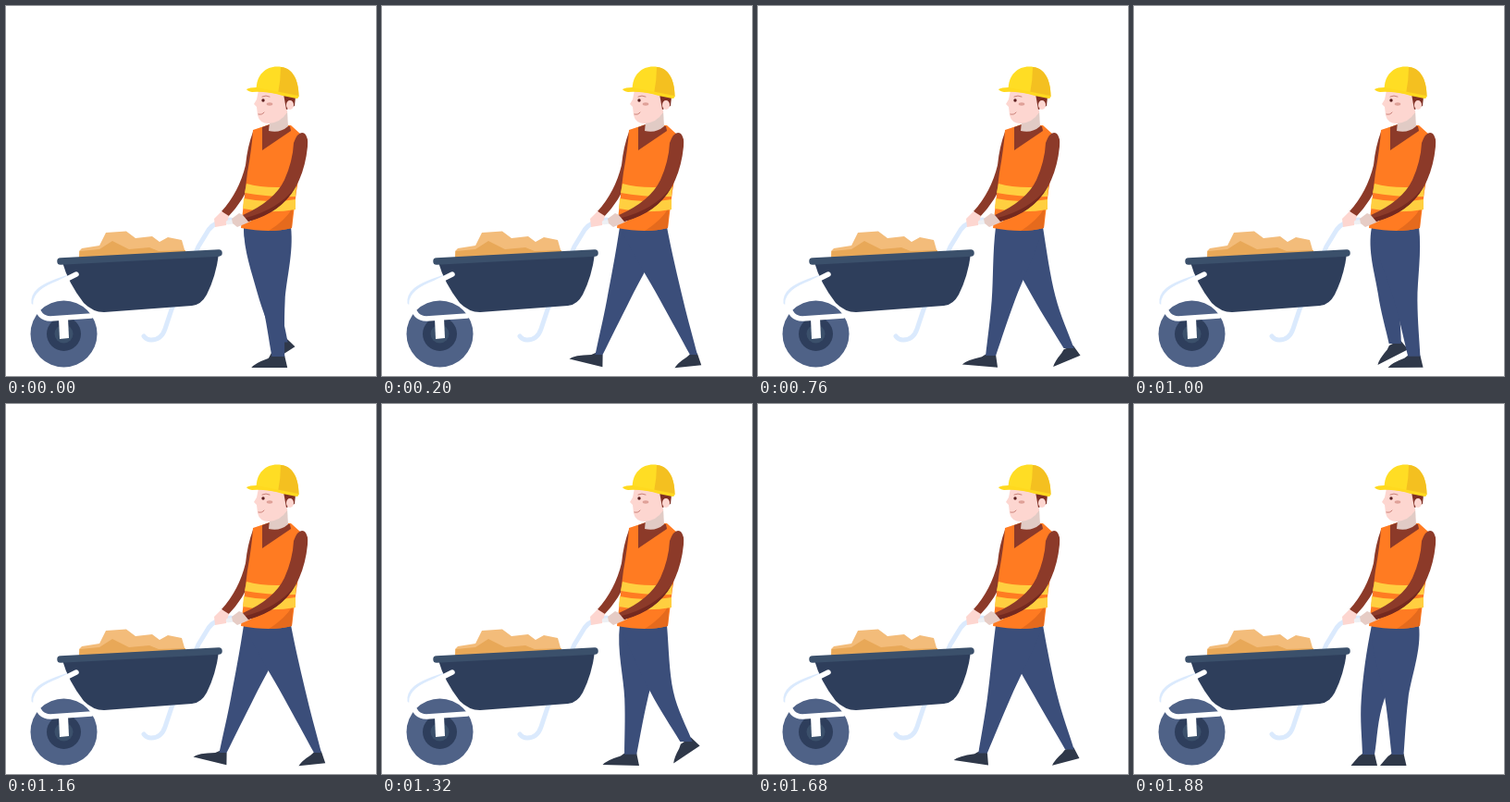
These frames come from a looping animation (400x400 px, 1.92 s). An HTML page:

```html
<!DOCTYPE html>
<html lang="en">
<head>
<meta charset="utf-8">
<title>Worker pushing a wheelbarrow</title>
<style>
html, body { margin: 0; width: 100%; height: 100%; overflow: hidden; background: #fff; }
svg { display: block; width: 100%; height: 100%; }
.line { fill: none; stroke-linecap: round; stroke-linejoin: round; }
.sleeve { fill: #8c3a29; }
.skin { fill: #fdd6d0; }
</style>
</head>
<body>
<svg viewBox="0 0 400 400">
  <!-- wheelbarrow -->
  <g class="line" stroke="#dbeafd" stroke-width="5">
    <path d="M243 231Q226 232 219 242L208 260L179 328L172 349Q168 361 157 361Q152 361 149 357"/>
    <path d="M29 321Q28 313 36 306Q46 298 75 290" stroke-width="3"/>
  </g>
  <circle cx="62.5" cy="354.5" r="36" fill="#4f6287"/>
  <circle cx="62.5" cy="354.5" r="18.5" fill="#2e3e5c"/>
  <circle cx="62.5" cy="354.5" r="10" fill="#3b506b"/>
  <path d="M57 338L67 337L68 359L58 360Z" fill="#fff"/>
  <path d="M79 272V265L82 262L101 259L108 245L130 243.5L140 251L158 249L166 255L175 250L190 253L194 267Z" fill="#f3bc7a"/>
  <path d="M79 272L80 265L101 263L115 254L133 263L155 261L165 265L194 264V268Z" fill="#e8a858"/>
  <path d="M61 277L230 268Q227 292 217 312Q211 323 201 324L106 331Q94 331 84 321Q67 299 61 277Z" fill="#2e3e5b"/>
  <path class="line" d="M59 276L230 267" stroke="#3b506b" stroke-width="7.5"/>
  <path class="line" d="M76 290L58 299Q32 309 32 321Q35 338 48 338L92 335" stroke="#fff" stroke-width="5.5"/>

  <!-- worker -->
  <g id="legs"></g>
  <path class="sleeve" d="M267 136Q261 152 259 172Q252 201 233 222L240 228Q258 209 264 190L272 138Z"/>
  <path d="M267 134L285 128L308 129L318 138Q318 180 314 200L309 240Q286 246 254 240Q257 212 261 180Q266 152 267 134Z" fill="#ff7b22"/>
  <path d="M310 218L309 240Q298 243 284 243Q302 232 310 218Z" fill="#e56a1d"/>
  <path d="M260 192Q280 198 314 195L313 206Q285 207 258 202ZM257 208Q285 214 313 209V220Q285 225 256 219Z" fill="#ffcf40"/>
  <path class="sleeve" d="M277 131L285 128L307 130L308 135L277 156Z"/>
  <path d="M285 125L304 113L305 130Q296 138 284 135Z" fill="#e1cbc5"/>
  <path class="skin" d="M273 91L271 101L268 106L271 109L272 118Q274 127 284 127Q297 126 304 115L302 95Z"/>
  <path d="M300 95L313 98L312 108L303 112Z" fill="#7e2f24"/>
  <ellipse class="skin" cx="307" cy="107" rx="4" ry="5"/>
  <circle cx="278" cy="102" r="1.7" fill="#5c2020"/>
  <ellipse cx="285" cy="106" rx="3.3" ry="1.7" fill="#dfa198"/>
  <path class="line" d="M277 98Q281 96 285 98M273 117Q277 118 279 115" stroke="#c98078"/>
  <path d="M270.500 91C270.500 74 281 65.500 293 65.500C307 65.500 316.500 76 316.500 98L294 95Z" fill="#ffdd24"/>
  <path d="M297 66C309 67 316.500 78 316.500 98L294 95Q297 80 297 66Z" fill="#f4c020"/>
  <path d="M260 90Q263 88 271 88L316 97Q317 100 314 100L299 97Q282 92 266 93Q261 92 260 90Z" fill="#ffd91f"/>
  <path class="skin" d="M233 222L241 227L238 237L226 239L225 230Z"/>
  <path class="line" d="M240 234L263 231" stroke="#eef0f4" stroke-width="4.5"/>
  <path d="M244 230L252 224L259 227L262 234L250 239L245 235Z" fill="#e6ccc5"/>
  <path class="sleeve" d="M311 148Q316 134 323 138Q327 142 326 152Q324 172 317 188Q304 220 262 233L256 226Q290 211 301 188Q310 168 311 148Z"/>
  <path d="M312 197Q298 223 262 233L259 229Q294 220 312 197Z" fill="#74291f"/>
</svg>
<script>
const LOOP = 1920, STRIDE = 960, FRAME = 40;
const HIP = { x: 282.5, y: 239, half: 25.5 };
const FRONT_X = 234.5, REAR_X = 337;

const mix = (a, b, k) => a + (b - a) * k;
const ease = k => k * k * (3 - 2 * k);
const clamp = k => Math.max(0, Math.min(1, k));

// Half a stride the foot carries the body backwards, the other half it swings forward
function gait(phase) {
  const swing = phase >= .5, u = phase * 2 % 1, arc = Math.sin(Math.PI * u);
  const shared = { width: 4 + 3 * arc };
  return swing ? {
    ...shared,
    x: mix(REAR_X, FRONT_X, ease(u ** 1.6)),
    y: 377 - 14 * arc,
    angle: mix(-6, 14, u) - 40 * arc,
    toe: mix(22, 30, u),
    bend: 7 * arc
  } : {
    ...shared,
    x: mix(FRONT_X, REAR_X, u),
    y: 377 + 2 * arc,
    angle: 14 * (1 - u) ** 6 - 6 * u ** 6,
    toe: 30 - 8 * u ** 4,
    bend: 0
  };
}

const standing = (x, bend) => ({ x, y: 379, angle: 0, toe: 19, width: 6.5, bend });

function blend(a, b, k) {
  return Object.fromEntries(Object.keys(a).map(key => [key, mix(a[key], b[key], k)]));
}

// One side of a leg from hip over knee to ankle; sign is -1 in front, 1 behind
function side(sign, { x, y, width, bend }) {
  const hx = HIP.x + sign * HIP.half, hy = HIP.y, ax = x + sign * width;
  const kx = mix(HIP.x, x, .56) - bend + sign * 12.5, ky = mix(hy, y, .57);
  const tx = (ax - hx) / 6, ty = (y - hy) / 6;
  const bulge = 7 * clamp(1 - Math.abs(x - HIP.x) / 45);
  return [
    [hx, hy], [mix(hx, kx, .3) + sign * bulge, mix(hy, ky, .35)], [kx - tx, ky - ty], [kx, ky],
    [kx + tx, ky + ty], [mix(kx, ax, .7), mix(ky, y, .7)], [ax, y]
  ];
}

function makeLeg(contact, rest) {
  const add = fill => {
    const el = document.createElementNS("http://www.w3.org/2000/svg", "path");
    el.setAttribute("fill", fill);
    return document.getElementById("legs").appendChild(el);
  };
  const shoe = add("#2f3849"), cloth = add("#3b4e7a");
  return (t, settle) => {
    const phase = (t - contact + STRIDE) % STRIDE / STRIDE;
    const foot = blend(gait(phase), rest, settle);
    const { x, y, width, angle, toe } = foot;
    const front = side(-1, foot), back = side(1, foot).reverse();
    cloth.setAttribute("d", `M${front[0]}C${front.slice(1)}L${back[0]}C${back.slice(1)}Z`);
    shoe.setAttribute("d", `M${-toe} 12Q${4 - toe} 7 ${-width - 4} 2L${-width} -1H${width}L${width + 3} 12Z`);
    shoe.setAttribute("transform", `translate(${x} ${y}) rotate(${angle})`);
  };
}

const legs = [makeLeg(200, standing(253.5, 8)), makeLeg(680, standing(285, 0))];

const start = performance.now();
function tick() {
  const t = Math.floor((performance.now() - start) % LOOP / FRAME) * FRAME;
  // The walk settles into a standing pose before the loop restarts
  const settle = ease(clamp((t - 1720) / 160));
  legs.forEach(drawLeg => drawLeg(t, settle));
  requestAnimationFrame(tick);
}
tick();
</script>
</body>
</html>
```
